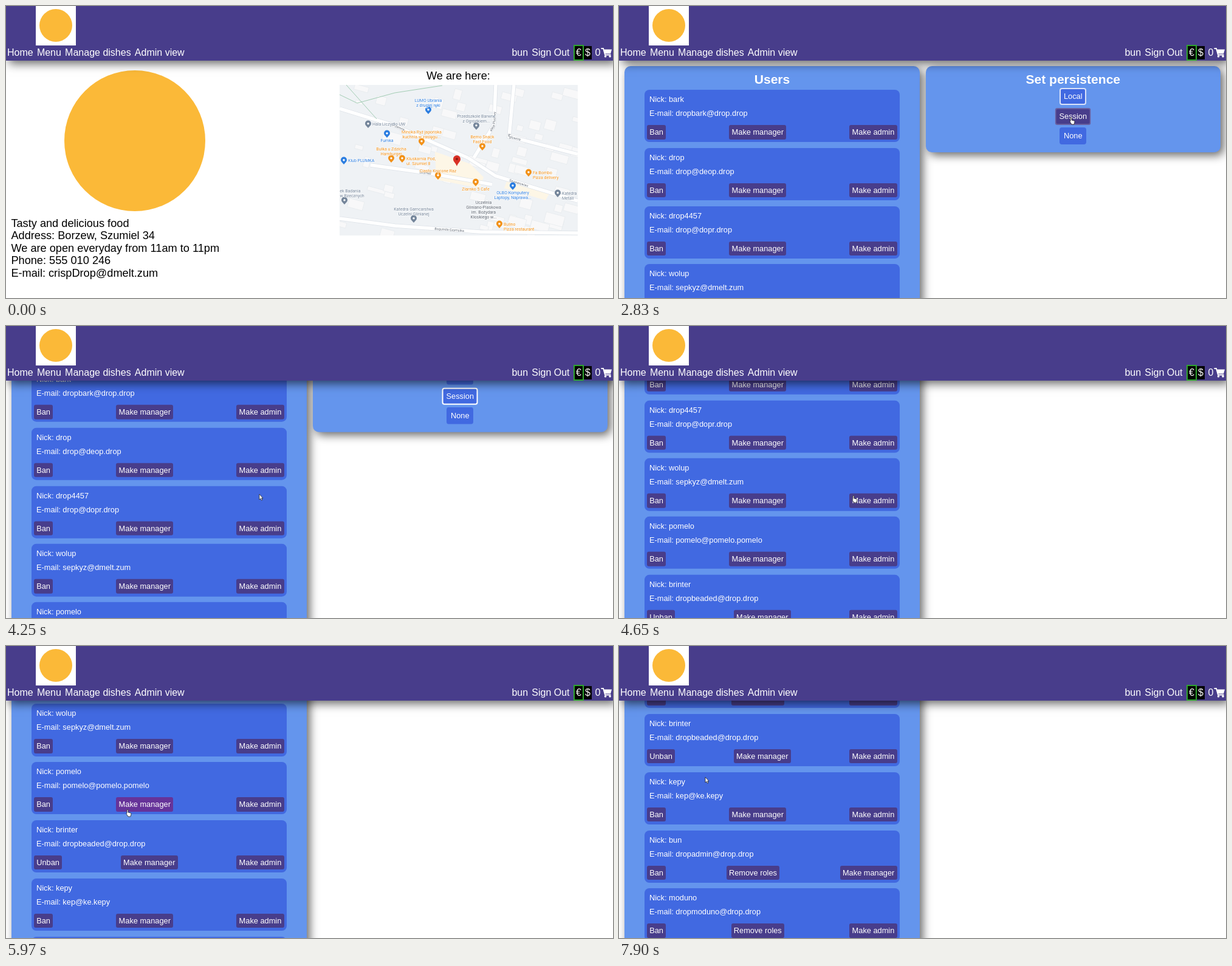
Write an HTML page that moves like this. It is 999 px wide and 481 px high and loops after 8000 ms.

```html
<!DOCTYPE html>
<html lang="en">
<head>
<meta charset="utf-8">
<title>Restaurant admin</title>
<style>
  html, body { margin: 0; width: 100%; height: 100%; overflow: hidden; background: #fff; }
  body { position: relative; font: 12.8px "Liberation Sans", Arial, sans-serif; color: #fff; }
  svg { position: absolute; left: 0; top: 0; display: block; }
  #map text { font: 7px Roboto, sans-serif; paint-order: stroke; stroke: #fff; stroke-width: 1px; }
  header, .panel { position: absolute; box-shadow: 5px 5px 15px rgba(0,0,0,.6); }
  header { left: 0; top: 0; width: 999px; height: 90px; background: #483d8b; }
  #admin { position: absolute; left: 0; top: 0; width: 999px; }
  .panel { top: 99px; box-sizing: border-box; padding-top: 10px; border-radius: 10px; background: #6495ed; }
  #users { left: 9px; width: 486px; height: 1150px; }
  #modes { left: 504.5px; width: 485.5px; height: 142px; text-align: center; }
  h3 { margin: 0 0 5px; font-size: 21.06px; line-height: 24px; text-align: center; }
  .card { position: relative; box-sizing: border-box; width: 420px; height: 86.3px; margin: 0 33px 9.5px;
    padding: 4px 0 0 8px; border-radius: 8px; background: #4169e1; line-height: 23.1px; }
  .row { position: absolute; left: 4px; right: 4.5px; top: 58px; display: flex; justify-content: space-between; }
  .row span { padding: 0 4.2px; border-radius: 3px; background: #483d8b; line-height: 23.5px; }
  .row .on { background: #663399; }
  .mode { position: absolute; left: 50%; transform: translateX(-50%); padding: 0 4.7px; border: 2px solid transparent;
    border-radius: 4px; line-height: 24px; background: #4169e1 border-box; }
  .mode.on { background-color: #483d8b; }
  #link { fill: transparent; }
  #link.on { fill: #663399; }
</style>
</head>
<body>
<svg id="home" width="999" height="481">
  <circle cx="212" cy="222" r="116" fill="#fbb938"/>
  <g id="about" font-size="18.2"><text x="692" y="121.3">We are here:</text></g>
  <svg id="map" x="549" y="130" width="392" height="248" viewBox="549 130 392 248">
    <path fill="#eff2f5" d="M549 130h392v248h-392z"/>
    <g id="blocks"></g>
    <path fill="#fdf6e6" d="M706 240l58 20 22 22-6 18-72-14zM826 284l70 22-8 14-68-20z"/>
    <g id="edges" fill="none" stroke="#dde2e8" stroke-width="7"></g>
    <use href="#roads"/>
    <path d="M549 146L578 160 640 143 718 131M560 130L610 186" fill="none" stroke="#a3cdb4"/>
    <g id="labels"></g>
    <path d="M742 264c-2-6-6-7-6-12a6 6 0 0 1 12 0c0 5-4 6-6 12z" fill="#d93025"/>
    <circle cx="742" cy="252" r="2" fill="#8c1a11"/>
  </svg>
</svg>

<div id="admin">
  <div class="panel" id="users"><h3>Users</h3></div>
  <div class="panel" id="modes"><h3>Set persistence</h3></div>
</div>

<header>
  <svg width="999" height="90">
    <path fill="#fff" d="M49 0h66v65h-66z"/><circle cx="82" cy="32" r="27" fill="#fbb938"/>
    <path id="link" d="M207 65h88v25h-88z"/>
    <path d="M951 66h13v22h-13z"/><path d="M935 65h15v24h-15z" stroke="#2fa52f" stroke-width="2"/>
    <g id="nav" font-size="16" fill="#fff"></g>
    <path d="M979.5 70H983L986 80.5H995.5" fill="none" stroke="#fff" stroke-width="1.8"/>
    <path d="M983 71.5h14l-2 7h-10z" fill="#fff"/>
    <g fill="#fff"><circle cx="986.5" cy="83" r="1.8"/><circle cx="994" cy="83" r="1.8"/></g>
  </svg>
</header>

<svg width="999" height="481">
  <g id="cursor" fill="#fff" stroke="#222" stroke-width=".8" stroke-linejoin="round">
    <path id="arrow" d="M0 0V9L2 7.2 3.5 10.2 5 9.4 3.6 6.6H6z"/>
    <path id="hand" d="M1 1q1-1.5 2 0v4l4 1q1 .4 1 1.6L7 12H3L0 7.5q0-1.2 1-.8z"/>
  </g>
</svg>

<script>
const $ = id => document.getElementById(id);
const add = (id, html) => $(id).insertAdjacentHTML("beforeend", html);
const text = (x, y, s, more = "") => `<text x="${x}" y="${y}" ${more}>${s}</text>`;

// Navigation and contact lines
const menu = (x, ...items) => add("nav", text(x, 82.3, items.map((s, i) => `<tspan dx="${i && 6.2}">${s}</tspan>`).join("")));
menu(2, "Home", "Menu", "Manage dishes", "Admin view");
menu(832.4, "bun", "Sign Out");
menu(938, "€", "$");
menu(969.5, "0");
["Tasty and delicious food", "Address: Borzew, Szumiel 34", "We are open everyday from 11am to 11pm",
 "Phone: 555 010 246", "E-mail: crispDrop@dmelt.zum"].forEach((s, i) => add("about", text(8.4, 363.6 + i * 20.6, s)));

// Map: blocks, streets with their names, places with pins
let seed = 7;
const rnd = () => (seed = seed * 16807 % 2147483647) / 2147483647;
for (let i = 0; i < 70; i++) {
  const x = 545 + rnd() * 390, y = 128 + rnd() * 245;
  add("blocks", `<rect x="${x}" y="${y}" width="${10 + rnd() * 22}" height="${6 + rnd() * 12}"
    transform="rotate(15 ${x} ${y})" fill="#f8f8f9" stroke="#e4e8ec" stroke-width=".6"/>`);
}
const streets = { Drzemna: "M549 169L640 197 760 250", Szuwarowiec: "M760 250L806 280 941 321", "aleja Pluskwy": "M770 250L803 196 806 130",
  Szumiel: "M600 262L700 276 800 294", "Bogumiła Gzymsika": "M549 350L640 362 780 372 941 374", "Mgłownia": "M836 130L828 215 941 244" };
add("edges", `<g id="streets">${Object.values(streets).map((d, i) => `<path id="street${i}" d="${d}"/>`).join("")}</g>`);
add("labels", `<use href="#streets" style="--w:5" stroke="#fff"/>`);
document.querySelector('use[href="#roads"]').remove();
$("labels").firstElementChild.remove();
add("edges", `<g stroke="#fff" stroke-width="5.5">${Object.values(streets).map(d => `<path d="${d}"/>`).join("")}</g>`);
Object.keys(streets).forEach((name, i) => add("labels",
  `<text fill="#5b6470" dy="2"><textPath href="#street${i}" startOffset="40%" style="font-size:5.5px">${name}</textPath></text>`));

const orange = "#f29118", blue = "#2b7de0", slate = "#74859a";
const lines = (x, y, c, s, anchor) => s.split("|").forEach((line, i) =>
  add("labels", text(x, y + i * 8, line, `fill="${c}" text-anchor="${anchor}"`)));
function place(side, x, y, c, s) {
  add("labels", `<path d="M${x} ${y + 6}l-3.6-4a5 5 0 1 1 7.2 0z" fill="${c}"/><circle cx="${x}" cy="${y - 1.2}" r="1.7" fill="#fff"/>`);
  const rows = s.split("|").length;
  if (side === "right") lines(x + 7, y + 2, c, s, "start");
  else lines(x, side === "up" ? y - 8 * rows + 2 : y + 13, c, s, "middle");
}
place("up", 695, 172, blue, "LUMO Ubrania|z drugiej ręki");
place("up", 774, 198, slate, "Przedszkole Barwne|z Ogródkiem...");
place("up", 684, 224, orange, "Minoka Ryż japońska|kuchnia w zasięgu...");
place("up", 784, 232, orange, "Bemo Snack|Fast Food");
place("up", 634, 252, orange, "Bułka u Zdzicha|Hamburger");
place("up", 711, 280, orange, "Ciasto Kręcone Raz");
place("up", 557, 321, slate, "Ośrodek Badania|Kamyków Rzecznych");
place("up", 671, 351, slate, "Katedra Garncarstwa|Uczelni Glinianej");
place("down", 627, 211, blue, "Fumka");
place("down", 773, 291, orange, "Ziarnko 5 Cafe");
place("down", 834, 297, blue, "OLBO Komputery|Laptopy, Naprawa...");
place("right", 596, 195, slate, "Hala Liczydło UW");
place("right", 652, 252, orange, "Kluskarnia Pod,|ul. Szumiel 8");
place("right", 556, 255, blue, "Klub PLUMKA");
place("right", 860, 275, orange, "Fa Bombo|Pizza delivery");
place("right", 908, 309, slate, "Katedra|Metali");
place("right", 812, 360, orange, "Bulino|Pizza restaurant");
lines(786, 326, "#5b6470", "Uczelnia|Gliniano-Piaskowa|im. Bożydara|Kłoskiego w...", "middle");

// Admin cards
const roles = { none: ["Ban", "Make manager", "Make admin"], banned: ["Unban", "Make manager", "Make admin"],
  manager: ["Ban", "Remove roles", "Make admin"], admin: ["Ban", "Remove roles", "Make manager"] };
const buttons = role => roles[role].map(s => `<span>${s}</span>`).join("");
[["bark", "dropbark@drop.drop"], ["drop", "drop@deop.drop"], ["drop4457", "drop@dopr.drop"],
 ["wolup", "sepkyz@dmelt.zum"], ["pomelo", "pomelo@pomelo.pomelo"], ["brinter", "dropbeaded@drop.drop", "banned"],
 ["kepy", "kep@ke.kepy"], ["bun", "dropadmin@drop.drop", "admin"], ["moduno", "dropmoduno@drop.drop", "manager"]]
.forEach(([nick, mail, role = "none"]) => add("users",
  `<div class="card">Nick: ${nick}<br>E-mail: ${mail}<div class="row">${buttons(role)}</div></div>`));
["Local", "Session", "None"].forEach((s, i) => add("modes", `<span class="mode" style="top:${36 + i * 32.7}px">${s}</span>`));

const row = document.querySelectorAll(".row")[4];
const [local, session] = document.querySelectorAll(".mode");

const ramp = (t, from, to) => Math.min(1, Math.max(0, (t - from) / (to - from)));
const ease = (t, from, to) => { const p = ramp(t, from, to); return p * p * (3 - 2 * p); };

// Cursor moves: start, end, x, y
const moves = [[300, 620, 508, 48], [620, 1000, 266, 72], [1460, 1960, 650, 191], [2020, 2440, 742, 183],
  [3000, 3350, 630, 265], [3450, 4050, 417, 277], [4250, 4650, 384, 279], [4650, 5270, 334, 277],
  [5270, 5970, 198, 269], [6500, 7400, 284, 291], [7780, 7880, 142, 216]];
const cursorAt = t => moves.reduce(([x, y], [from, to, mx, my]) => {
  const p = ramp(t, from, to);
  return [x + (mx - x) * p, y + (my - y) * p];
}, [870, 388]);

const show = (id, on) => $(id).style.display = on ? "" : "none";
const glow = (el, a) => el.style.borderColor = `rgba(255,255,255,${a})`;
function isOver(el, x, y) {
  const r = el.getBoundingClientRect();
  return x >= r.left && x < r.right && y >= r.top && y < r.bottom;
}

let role = "";
function draw(now) {
  const t = now % 8000, [x, y] = cursorAt(t);
  const scroll = 330 * ease(t, 3865, 5206) + 175 * ease(t, 6350, 7500);
  const scrolling = scroll % 330 > 0 && scroll < 505;
  show("home", t < 1120);
  show("admin", t >= 1120);
  show("cursor", t >= 300);
  $("admin").style.transform = `translateY(${-scroll}px)`;
  $("cursor").setAttribute("transform", `translate(${x} ${y})`);

  glow(local, ramp(t, 1350, 1880) * (1 - ramp(t, 2730, 3250)));
  glow(session, ramp(t, 2730, 3300));
  const next = t < 6200 ? "none" : "manager";
  if (next !== role) row.innerHTML = buttons(role = next);

  let hand = false;
  for (const el of document.querySelectorAll("#link, .mode, .row span")) {
    const over = isOver(el, x, y);
    hand ||= over;
    el.classList.toggle("on", over && !scrolling);
  }
  show("hand", hand);
  show("arrow", !hand);
  requestAnimationFrame(draw);
}
draw(performance.now());
</script>
</body>
</html>
```
